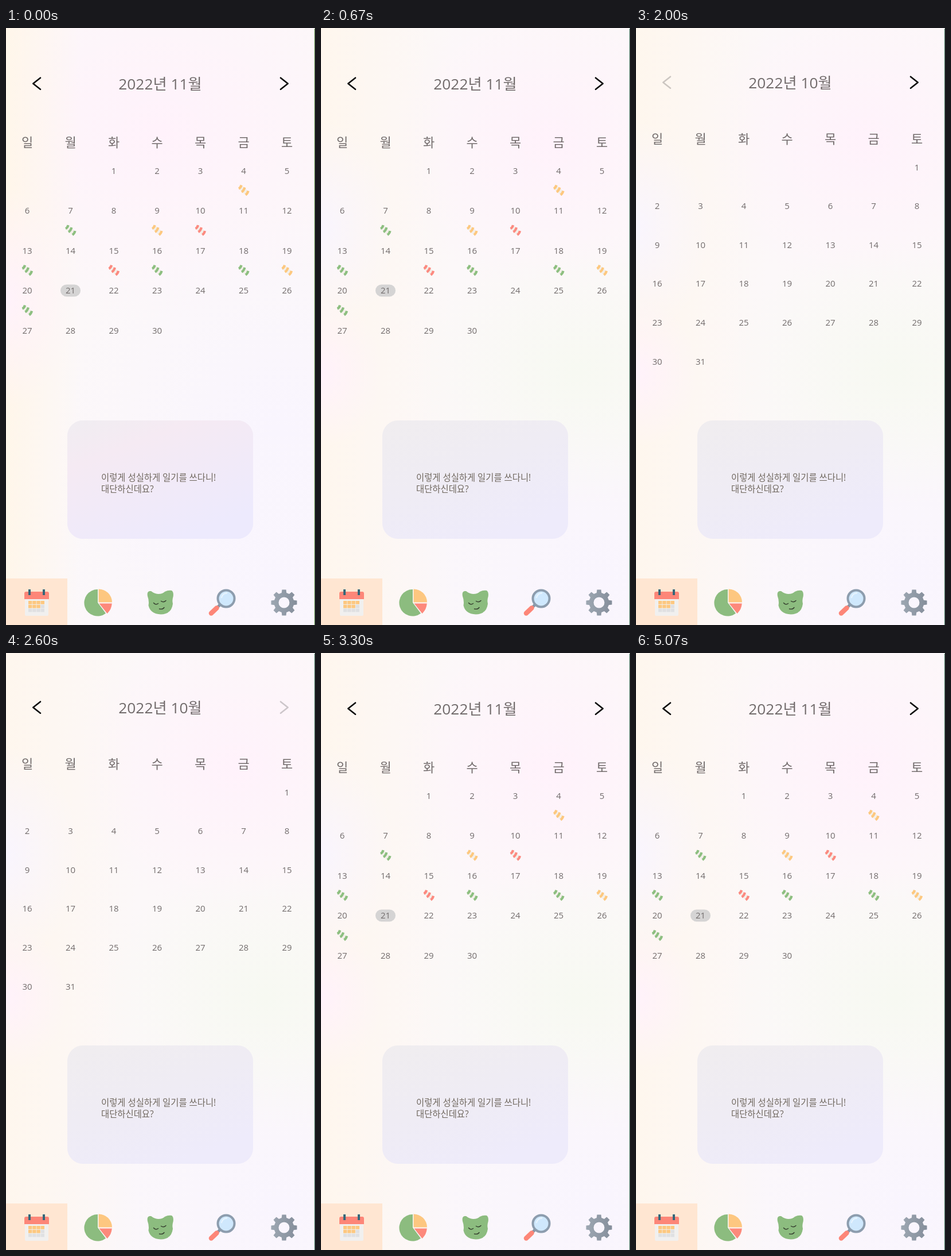
An HTML page that plays this animation: 539 px wide and 1039 px high, repeating every 5.11 s.

```html
<!DOCTYPE html>
<html lang="ko">
<head>
<meta charset="utf-8">
<title>Calendar</title>
<style>
  html, body { margin: 0; width: 100%; height: 100%; overflow: hidden; background: #fbf7f9; }
  svg { display: block; width: 100%; height: 100%; }
  text { font-family: "Open Sans", "Noto Sans CJK KR", "Noto Sans CJK", sans-serif; fill: #716b6b; }
  .title { font-size: 26.3px; font-weight: 500; }
  .weekday { font-size: 22px; font-weight: 500; }
  .date { font-size: 15px; }
  .note { font-size: 15.4px; font-weight: 500; fill: #70685f; }
  .mid { text-anchor: middle; }
  .chevron { fill: none; stroke: #080808; stroke-width: 2.6; stroke-linecap: round; stroke-linejoin: round; }
</style>
</head>
<body>
<svg viewBox="0 0 539 1039" preserveAspectRatio="none">
  <defs>
    <linearGradient id="cream"><stop stop-color="#fff6ea"/><stop offset="1" stop-color="#fff6ea" stop-opacity="0"/></linearGradient>
    <radialGradient id="pink"><stop stop-color="#fff2fb"/><stop offset="1" stop-color="#fff2fb" stop-opacity="0"/></radialGradient>
    <radialGradient id="green"><stop stop-color="#f7f9f2"/><stop offset="1" stop-color="#f7f9f2" stop-opacity="0"/></radialGradient>
    <radialGradient id="lilac"><stop stop-color="#f9f5fe"/><stop offset="1" stop-color="#f9f5fe" stop-opacity="0"/></radialGradient>
    <linearGradient id="card" x2=".6" y2="1"><stop stop-color="#f0edef"/><stop offset=".5" stop-color="#efecf4"/><stop offset="1" stop-color="#eeebfb"/></linearGradient>
    <linearGradient id="cardPink" x2=".6" y2="1"><stop stop-color="#f0edf1"/><stop offset=".3" stop-color="#f5eaf3"/><stop offset="1" stop-color="#edeafd"/></linearGradient>
    <linearGradient id="steel"><stop stop-color="#9da7b2"/><stop offset="1" stop-color="#858e9b"/></linearGradient>
  </defs>

  <rect width="539" height="1039" fill="#fcf8f9"/>
  <ellipse cx="480" cy="960" rx="430" ry="330" fill="url(#lilac)"/>
  <g id="late">
    <ellipse cx="400" cy="200" rx="300" ry="260" fill="url(#pink)"/>
    <ellipse cx="450" cy="600" rx="300" ry="230" fill="url(#green)"/>
    <rect width="230" height="1039" fill="url(#cream)" opacity=".75"/>
    <ellipse cx="0" cy="350" rx="130" ry="190" fill="url(#lilac)"/>
    <ellipse cx="0" cy="600" rx="110" ry="130" fill="url(#pink)"/>
  </g>
  <g id="early">
    <ellipse cx="270" cy="180" rx="430" ry="330" fill="url(#pink)"/>
    <ellipse cx="480" cy="700" rx="400" ry="400" fill="url(#lilac)"/>
    <rect width="130" height="1039" fill="url(#cream)"/>
    <ellipse cx="0" cy="470" rx="120" ry="190" fill="url(#pink)"/>
  </g>

  <g id="months"></g>

  <rect x="107" y="683" width="324" height="206" rx="27" fill="url(#card)"/>
  <rect id="cardEarly" x="107" y="683" width="324" height="206" rx="27" fill="url(#cardPink)"/>
  <text class="note" x="166" y="788">이렇게 성실하게 일기를 쓰다니!</text>
  <text class="note" x="166" y="808">대단하신데요?</text>

  <rect y="958" width="107" height="81" fill="#ffe6d2"/>
  <g id="calendarIcon">
    <path d="M33 992H74V1021Q74 1023 72 1023H35Q33 1023 33 1021Z" fill="#f1f0ef"/>
    <path d="M32 994V984Q32 981 35 981H72Q75 981 75 984V994Z" fill="#fd8678"/>
    <path d="M39 977h4v10h-4zM64 977h4v10h-4z" fill="#35677a"/>
  </g>
  <g>
    <path d="M160 1000V977A23.3 23.3 0 1 0 174 1018.7Z" fill="#8cbc7f"/>
    <path d="M161.5 999.5V976.5A23.2 23.2 0 0 1 185 999.5Z" fill="#fdc780"/>
    <path d="M162.5 1001.5H184.8Q184 1012 176.5 1019Z" fill="#fd897b"/>
  </g>
  <g fill="none" stroke="#36402f" stroke-width="1.4" stroke-linecap="round">
    <path d="M247 989Q245 979 253 980Q260 985 266 985Q273 985 277 981Q283 978 289 979Q293 982 291.5 990Q289.500 996 291 1002Q289 1020 270 1020.500Q252 1020 248.500 1005Q250 997 247 989Z" fill="#8cbc7f" stroke="none"/>
    <path d="M257.500 1000.500Q261 1005 265.500 1001.500M270.500 997.500Q275 1000.500 279 996.500M267.500 1011Q273 1012.500 276 1008.500"/>
  </g>
  <g fill="none" stroke-linecap="round">
    <path d="M373 1004L366 1011" stroke="#8795a5" stroke-width="5"/>
    <path d="M367.500 1009.500L358 1018.500" stroke="#fd8678" stroke-width="8.500"/>
    <circle cx="384" cy="993" r="14.500" fill="#cfe8fd" stroke="#8d9dae" stroke-width="4"/>
    <path d="M376 991Q378 984 385 983.500" stroke="#e7f4ff" stroke-width="2.500"/>
  </g>
  <path id="gear" fill="url(#steel)" fill-rule="evenodd"/>
  <path id="edge" d="M538.500 1V1039" stroke-width="1.200"/>
</svg>
<script>
const LOOP = 5110;
const GREEN = "#8dbf80", YELLOW = "#fdc87f", RED = "#fc8a80";
const columnX = i => 37 + 75.5 * i;
const byId = id => document.getElementById(id);
const clamp = v => Math.max(0, Math.min(1, v));
const ramp = (t, start, length) => clamp((t - start) / length);

function add(parent, tag, attrs, content) {
  const node = document.createElementNS("http://www.w3.org/2000/svg", tag);
  for (const key in attrs) node.setAttribute(key, attrs[key]);
  if (content !== undefined) node.textContent = content;
  parent.append(node);
  return node;
}

function label(parent, name, x, y, content) {
  add(parent, "text", { class: name + " mid", x, y }, content);
}

function addMarker(parent, x, y, color) {
  const g = add(parent, "g", { transform: `translate(${x} ${y})` });
  add(g, "path", { d: "M-5 -10L10 3L5 10L-9 -3Z", fill: "#f3efe9" });
  add(g, "path", {
    d: "M-8 -2.500Q-4.500 -4 -3.500 -8.500M-3 3.500Q.5 1.500 2.500 -4.500M4 8.500Q7.500 6 8.500 1.500",
    fill: "none", stroke: color, "stroke-width": 4.2
  });
}

function buildMonth({ month, first, days, chevronY, weekdayY, rowY, step, today, marks }) {
  const g = add(byId("months"), "g", {});
  label(g, "title", 269, chevronY + 10.7, `2022년 ${month}월`);
  const left = add(g, "path", { class: "chevron", d: `M60 ${chevronY - 10}L47.300 ${chevronY}L60 ${chevronY + 10}` });
  const right = add(g, "path", { class: "chevron", d: `M479 ${chevronY - 10}L491.700 ${chevronY}L479 ${chevronY + 10}` });
  [..."일월화수목금토"].forEach((day, i) => label(g, "weekday", columnX(i), weekdayY + 8, day));
  for (let day = 1; day <= days; day++) {
    const slot = first + day - 1;
    const x = columnX(slot % 7), y = rowY + step * Math.floor(slot / 7);
    if (day === today)
      add(g, "rect", { x: x - 17.5, y: y - 10.5, width: 35, height: 21, rx: 10.5, fill: "#d5d4d4" });
    label(g, "date", x, y + 5.5, day);
    if (marks[day]) addMarker(g, x - 0.5, y + 34, marks[day]);
  }
  return { g, left, right };
}

const november = buildMonth({
  month: 11, first: 2, days: 30, chevronY: 96.7, weekdayY: 198.5, rowY: 248, step: 69.65, today: 21,
  marks: { 4: YELLOW, 7: GREEN, 9: YELLOW, 10: RED, 13: GREEN, 15: RED, 16: GREEN, 18: GREEN, 19: YELLOW, 20: GREEN }
});
const october = buildMonth({
  month: 10, first: 6, days: 31, chevronY: 94.7, weekdayY: 192.5, rowY: 242, step: 67.6, marks: {}
});

for (let i = 0; i < 12; i++)
  add(byId("calendarIcon"), "rect", {
    x: 39 + 7.2 * (i % 4), y: 997 + 6.8 * Math.floor(i / 4), width: 6.4, height: 5.8,
    fill: i < 7 ? "#fdc87f" : "#dfe0e2"
  });

function gearPath(cx, cy) {
  const profile = [[-9, 22.8], [9, 22.8], [14, 17.5], [31, 17.5]];
  const points = [];
  for (let tooth = 0; tooth < 8; tooth++)
    for (const [offset, radius] of profile) {
      const a = (tooth * 45 + offset) * Math.PI / 180;
      points.push(`${(cx + radius * Math.cos(a)).toFixed(2)} ${(cy + radius * Math.sin(a)).toFixed(2)}`);
    }
  return `M${points.join("L")}ZM${cx - 9.5} ${cy}a9.500 9.500 0 1 0 19 0a9.500 9.500 0 1 0 -19 0Z`;
}
byId("gear").setAttribute("d", gearPath(485, 1000));

// A tapped arrow dims to 20% in 150 ms and recovers in 250 ms after release.
const PREVIOUS = { press: 1700, release: 2000 };
const NEXT = { press: 2400, release: 2780 };
const tapOpacity = (t, tap) =>
  1 - 0.8 * (t < tap.release ? ramp(t, tap.press, 150) : 1 - ramp(t, tap.release, 250));

function render(t) {
  const showOctober = t >= PREVIOUS.release && t < NEXT.release;
  october.g.style.display = showOctober ? "" : "none";
  november.g.style.display = showOctober ? "none" : "";
  for (const { left, right } of [november, october]) {
    left.style.opacity = tapOpacity(t, PREVIOUS);
    right.style.opacity = tapOpacity(t, NEXT);
  }
  const early = t < 200 ? 1 - 0.5 * ramp(t, 30, 170) : 0.5 * (1 - ramp(t, 350, 250));
  byId("early").style.opacity = early;
  byId("late").style.opacity = 1 - early;
  byId("cardEarly").style.opacity = 1 - ramp(t, 30, 150);
  byId("edge").setAttribute("stroke", t < 570 ? "#5c8c4c" : "#4f7d68");
}

function tick() {
  render(performance.now() % LOOP);
  requestAnimationFrame(tick);
}
tick();
</script>
</body>
</html>
```
